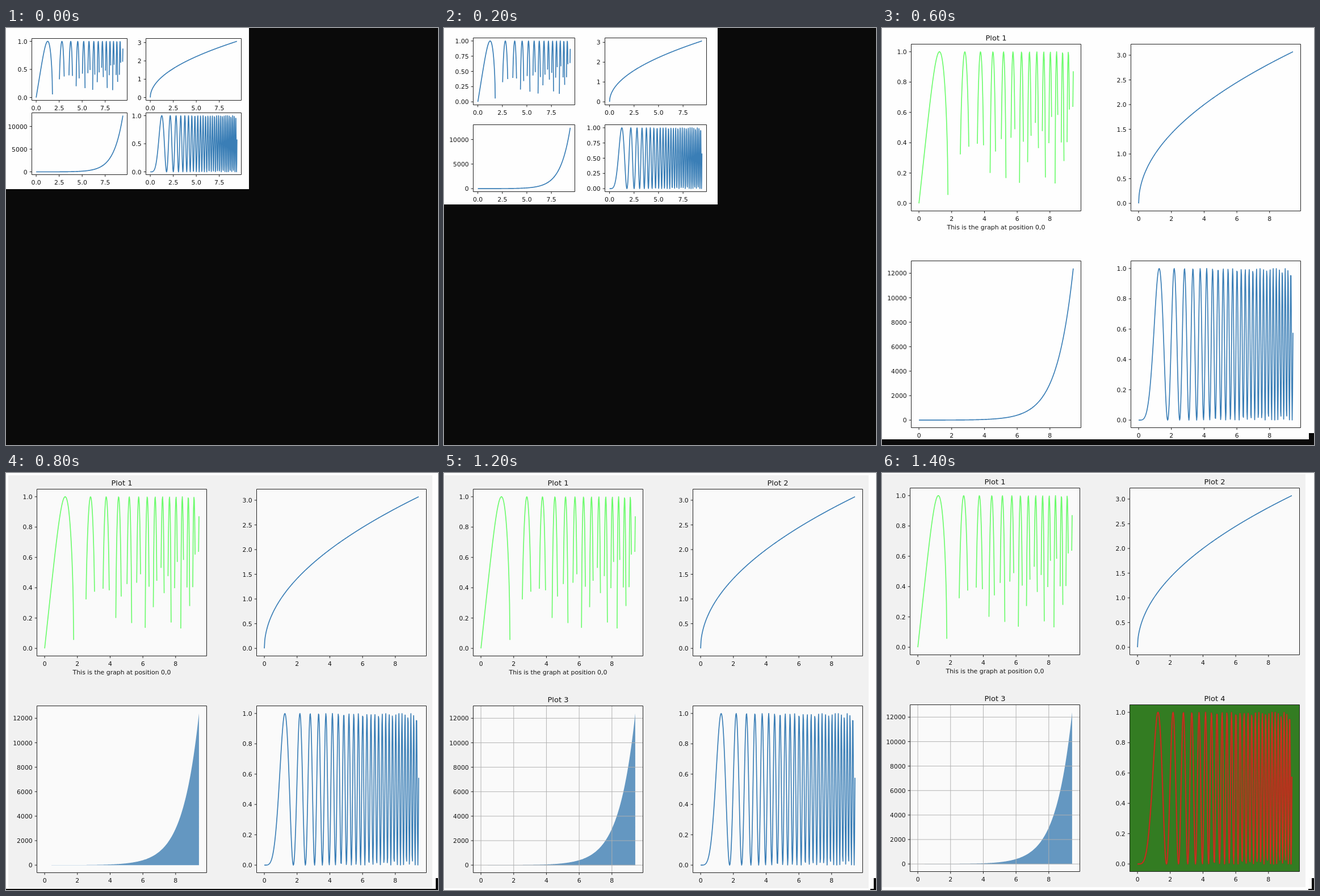
These frames come from a looping animation (761 by 735 pixels, 1.6 s). An HTML page with a canvas:

```html
<!DOCTYPE html>
<html lang="en">
<head>
<meta charset="utf-8">
<title>Subplots</title>
<style>
html, body { margin: 0; width: 100%; height: 100%; overflow: hidden; background: #0a0a0a; }
canvas { display: block; width: 761px; height: 735px; }
</style>
</head>
<body>
<canvas id="stage" width="761" height="735"></canvas>
<script>
const ctx = document.getElementById('stage').getContext('2d');
const FONT = '"DejaVu Sans", sans-serif';
const STEP = 200;
const BLUE = '#3a7eb6', GREEN = '#6cfb6c', FILL = '#6497c1', INK = '#161616';

// Four sampled functions on [0, 3π]
const xs = Array.from({ length: 400 }, (_, i) => i * 3 * Math.PI / 399);
const sample = fn => {
  const ys = xs.map(fn);
  const ok = ys.filter(y => !isNaN(y));
  return { ys, lo: Math.min(...ok), hi: Math.max(...ok) };
};
const curves = [
  sample(x => Math.sqrt(Math.sin(x * x))),
  sample(Math.sqrt),
  sample(Math.exp),
  sample(x => Math.sin(x * x) ** 2)
];

// Tick rules: [step, decimals] for x, then for the y axis of each plot
const coarse = { x: [2.5, 1], y: [[0.5, 1], [1, 0], [5000, 0], [0.5, 1]] };
const medium = { x: [2.5, 1], y: [[0.25, 2], [1, 0], [5000, 0], [0.25, 2]] };
const fine = { x: [2, 0], y: [[0.2, 1], [0.5, 1], [2000, 0], [0.2, 1]] };

// sheet: paper size; at: left/right columns, top/bottom rows; size: axes box
const big = { ticks: fine, size: [299, 294] };
const scenes = [
  { sheet: [428, 284], ticks: coarse, at: [45, 246, 18, 149], size: [168, 109] },
  { sheet: [482, 311], ticks: medium, at: [51, 283, 17, 170], size: [179, 118] },
  { ...big, sheet: [761, 714], at: [51, 438, 13, 394], shade: true },
  { ...big, sheet: [752, 725], at: [51, 438, 28, 410], titles: 1, green: true },
  { ...big, sheet: [757, 733], at: [54, 441, 28, 410], titles: 1, green: true,
    fill: true, grey: [4, 4, 747, 728] },
  { ...big, sheet: [751, 734], at: [52, 439, 28, 410], titles: 2, green: true,
    fill: true, grey: [2, 4, 747, 728] },
  { ...big, sheet: [751, 735], at: [51, 438, 28, 410], titles: 3, green: true,
    fill: true, grid: true, grey: [1, 4, 747, 728] },
  { ...big, sheet: [749, 735], at: [49, 436, 26, 408], titles: 4, green: true,
    fill: true, grid: true, red: true, grey: [0, 2, 746, 728] }
];

function rect(color, x, y, w, h) {
  ctx.fillStyle = color;
  ctx.fillRect(x, y, w, h);
}

function text(str, x, y, align, size = 10.9) {
  ctx.font = size + 'px ' + FONT;
  ctx.textAlign = align;
  ctx.fillStyle = INK;
  ctx.fillText(str, x, y);
}

function stroke(color, width) {
  ctx.strokeStyle = color;
  ctx.lineWidth = width;
  ctx.stroke();
}

function line(x1, y1, x2, y2, color) {
  ctx.beginPath();
  ctx.moveTo(x1, y1);
  ctx.lineTo(x2, y2);
  stroke(color, 0.95);
}

function scale(lo, hi, from, length) {
  const pad = (hi - lo) * 0.05;
  return v => from + (v - lo + pad) / (hi - lo + 2 * pad) * length;
}

function ticks([step, digits], hi) {
  const list = [];
  for (let i = 0; i * step <= hi * 1.04; i++) list.push([i * step, (i * step).toFixed(digits)]);
  return list;
}

function trace(ys, px, py) {
  let down = false;
  ctx.beginPath();
  ys.forEach((y, i) => {
    if (isNaN(y)) { down = false; return; }
    ctx[down ? 'lineTo' : 'moveTo'](px(xs[i]), py(y));
    down = true;
  });
}

function plot(s, n) {
  const { ys, lo, hi } = curves[n];
  const [w, h] = s.size;
  const left = s.at[n % 2] + 0.5, top = s.at[n < 2 ? 2 : 3] + 0.5;
  const bottom = top + h, mid = left + w / 2;
  const px = scale(0, 3 * Math.PI, left, w);
  const py = scale(lo, hi, bottom, -h);
  const xt = ticks(s.ticks.x, 9.5), yt = ticks(s.ticks.y[n], hi);
  const red = n === 3 && s.red, solid = n === 2 && s.fill;

  if (red || s.grey) rect(red ? '#337c22' : '#fafafa', left, top, w, h);

  trace(ys, px, py);
  if (solid) {
    ctx.lineTo(px(xs[399]), py(0));
    ctx.lineTo(px(0), py(0));
    ctx.fillStyle = FILL;
    ctx.fill();
  } else if (red) {
    stroke('#8f3a1c', 2.5);
    stroke('#d8301f', 1.2);
  } else {
    stroke(n === 0 && s.green ? GREEN : BLUE, 1.65);
  }

  if (n === 2 && s.grid) {
    for (const [v] of xt) line(px(v), top, px(v), bottom, '#b0b0b0');
    for (const [v] of yt) line(left, py(v), left + w, py(v), '#b0b0b0');
  }

  for (const [v, label] of xt) {
    line(px(v), bottom, px(v), bottom + 3.8, INK);
    text(label, px(v), bottom + 17, 'center');
  }
  for (const [v, label] of yt) {
    line(left - 3.8, py(v), left, py(v), INK);
    text(label, left - 7.7, py(v) + 4.1, 'right');
  }
  ctx.strokeStyle = '#222';
  ctx.lineWidth = 1;
  ctx.strokeRect(left, top, w, h);

  if (n < s.titles) text('Plot ' + (n + 1), mid, top - 6.5, 'center', 13.05);
  if (n === 0 && s.titles) text('This is the graph at position 0,0', mid, bottom + 32.8, 'center');
}

function draw(index) {
  const s = scenes[index];
  rect('#0a0a0a', 0, 0, 761, 735);
  // Earlier sheets stay visible under later, smaller ones
  for (let i = 0; i <= index; i++) rect('#fefefe', 0, 0, ...scenes[i].sheet);
  if (s.shade) {
    const g = ctx.createLinearGradient(0, 665, 0, 714);
    g.addColorStop(0, '#fefefe');
    g.addColorStop(1, '#f7f7f7');
    rect(g, 0, 665, 761, 49);
  }
  if (s.grey) rect('#f1f1f1', ...s.grey);
  for (let n = 0; n < 4; n++) plot(s, n);
}

ctx.lineJoin = 'round';
let shown = -1;
const start = performance.now();
function tick(now) {
  const index = Math.floor(Math.max(0, now - start) / STEP) % scenes.length;
  if (index !== shown) draw(shown = index);
  requestAnimationFrame(tick);
}
tick(start);
</script>
</body>
</html>
```
